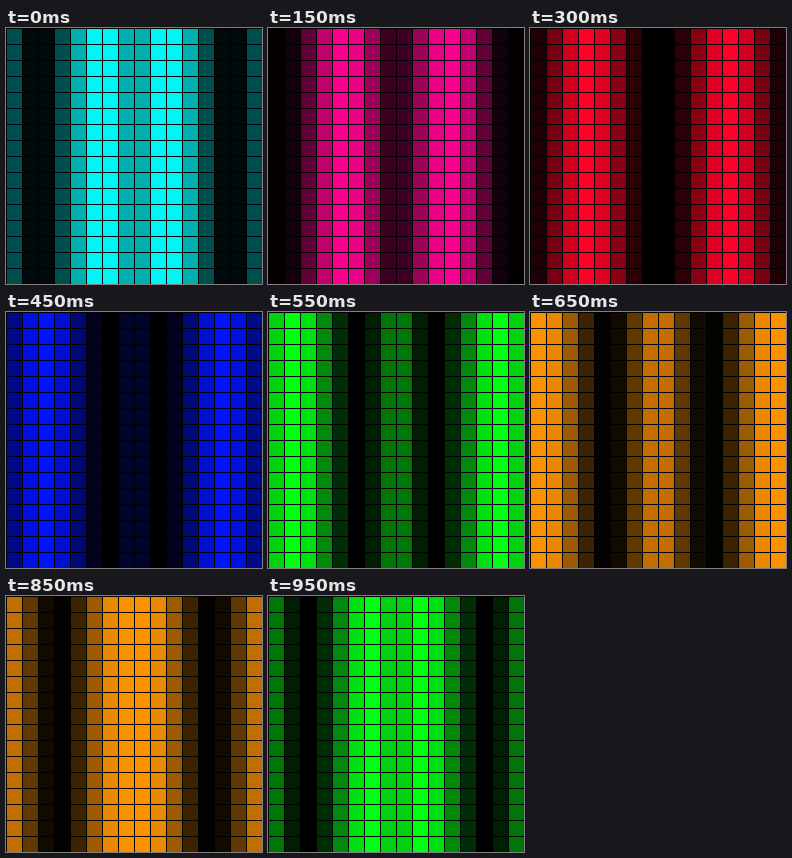
Write an HTML page that moves like this. It is 256 px wide and 256 px high and loops after 1000 ms.

```html
<!DOCTYPE html>
<html lang="en">
<head>
<meta charset="utf-8">
<title>Colour wave</title>
<style>
  html, body { margin: 0; width: 100%; height: 100%; overflow: hidden; background: #000; }
  svg { display: block; width: 100%; height: 100%; }
</style>
</head>
<body>
<svg viewBox="0 0 256 256" shape-rendering="crispEdges">
  <rect width="256" height="256" fill="#000"/>
  <g id="columns"></g>
  <path id="grid" fill="#000"/>
</svg>
<script>
  const NS = 'http://www.w3.org/2000/svg';
  const LOOP = 1000, STEP = 50;
  const COUNT = 16, CELL = 16, WAVE = 8;
  const TAU = Math.PI * 2;

  const group = document.getElementById('columns');
  const columns = Array.from({ length: COUNT }, (_, i) => {
    const rect = document.createElementNS(NS, 'rect');
    rect.setAttribute('x', i * CELL + 1);
    rect.setAttribute('y', 1);
    rect.setAttribute('width', CELL - 1);
    rect.setAttribute('height', COUNT * CELL - 1);
    return group.appendChild(rect);
  });

  // One-pixel rows across the columns split them into cells.
  document.getElementById('grid').setAttribute('d',
    columns.map((_, i) => `M0 ${i * CELL}h256v1h-256z`).join(''));

  // The hue swings through the wheel while the wave runs outward from the centre.
  function draw(ms) {
    const turn = Math.floor((ms % LOOP) / STEP) * STEP / LOOP;
    const hue = 180 + 180 * Math.sin(TAU * turn);
    columns.forEach((rect, i) => {
      const dist = Math.abs(i - (COUNT - 1) / 2);
      const level = 0.5 + 0.5 * Math.sin(TAU * (dist / WAVE - turn));
      rect.setAttribute('fill', `hsl(${hue.toFixed(2)}, 100%, ${(50 * level).toFixed(2)}%)`);
    });
  }

  const start = performance.now();
  function tick() {
    draw(performance.now() - start);
    requestAnimationFrame(tick);
  }
  tick();
</script>
</body>
</html>
```
